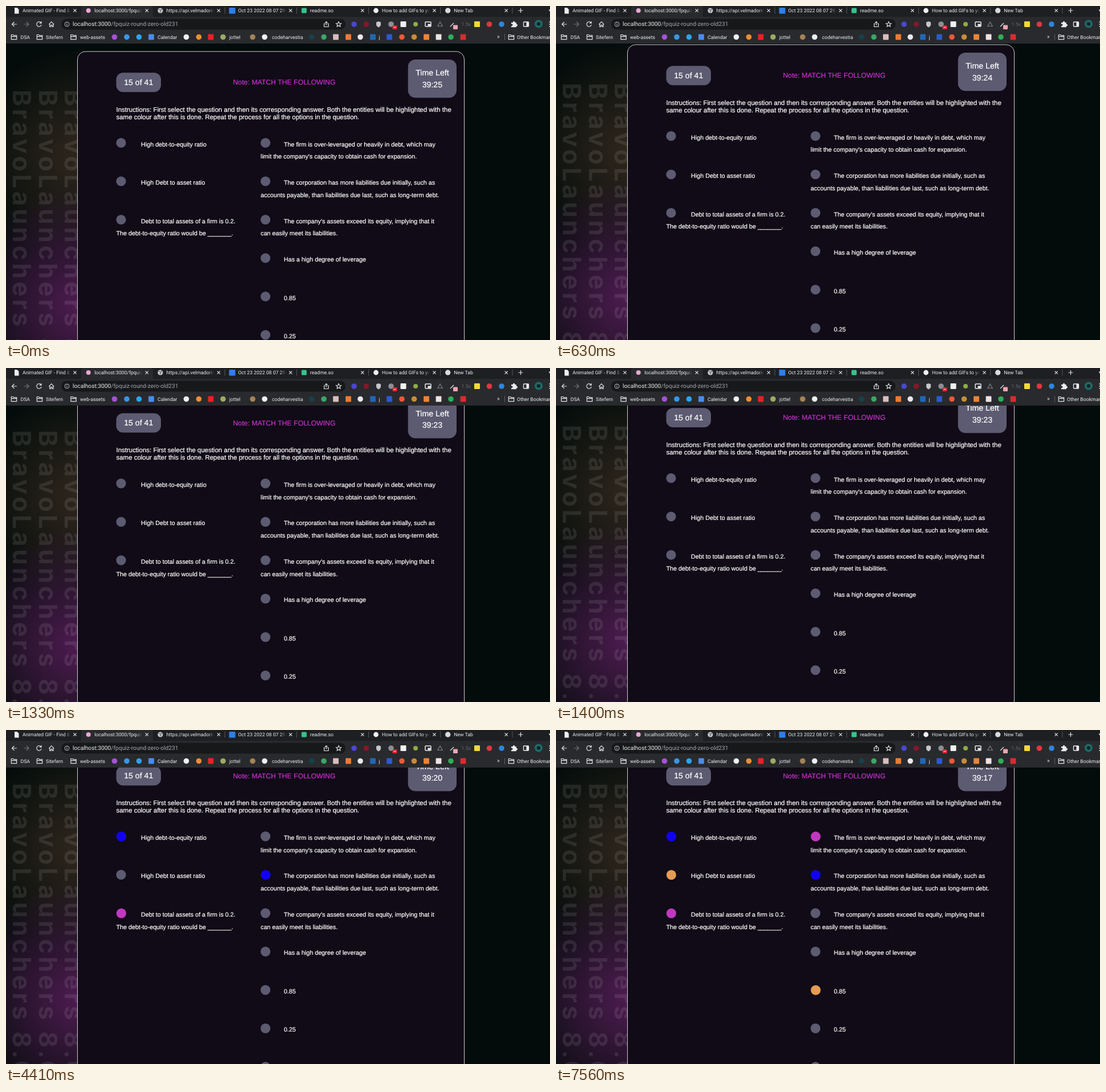
An HTML page for the animation above (8000 ms loop, 955 px wide and 587 px high).

```html
<!DOCTYPE html>
<html lang="en">
<head>
<meta charset="utf-8">
<title>Quiz</title>
<style>
html, body { margin: 0; width: 100%; height: 100%; overflow: hidden; background: #040c0b; }
svg { display: block; width: 100vw; height: 100vh; }
text { white-space: pre; text-rendering: geometricPrecision; }
.ui { font: 8.7px Roboto, sans-serif; fill: #eeeff1; }
.page { font: 10.78px "Liberation Sans", Arial, sans-serif; fill: #fff; }
.page text { stroke: #fff; stroke-width: .22; }
.page .note { font-size: 12.25px; fill: #c632cc; stroke: #c632cc; }
.page .intro { font-size: 11.46px; }
.page .big { font-size: 14.15px; text-anchor: middle; }
.page .deco { font: 700 44px Inter, sans-serif; letter-spacing: 5px; fill-opacity: .095; stroke: none; }
.line { fill: none; stroke: #e3e4e7; stroke-width: 1.2; }
</style>
</head>
<body>
<svg id="stage" viewBox="0 0 955 587" preserveAspectRatio="none"></svg>
<script>
const LOOP = 8000;
const STRIP = '#1e1f22', BAR = '#292a2d', PILL = '#17181a', GREY = '#5d5b71';
const BLUE = '#1200f4', PINK = '#c038c0', ORANGE = '#e69b52';

const TICKS = [210, 1260, 2310, 3360, 4410, 5390, 6440, 7490];
const SCROLL = [[560, -1.4], [630, -12], [700, -26.8], [1260, -30], [1330, -37.7], [1400, -47], [1470, -53.7]];
const PICKS = [[1960, 'q0', BLUE], [3010, 'a1', BLUE], [4060, 'q2', PINK],
  [5390, 'a0', PINK], [6440, 'q1', ORANGE], [7490, 'a4', ORANGE]];

const text = (x, y, s, attrs = '') => `<text x="${x}" y="${y}" ${attrs}>${s}</text>`;
const rect = (x, y, w, h, r, fill, attrs = '') =>
  `<rect x="${x}" y="${y}" width="${w}" height="${h}" rx="${r}" fill="${fill}" ${attrs}/>`;
const dot = (x, y, r, fill, attrs = '') => `<circle cx="${x}" cy="${y}" r="${r}" fill="${fill}" ${attrs}/>`;
const line = (d, attrs = '') => `<path class="line" d="${d}" ${attrs}/>`;
const fade = (id, color) => `<linearGradient id="${id}"><stop stop-color="${color}" stop-opacity="0"/>
  <stop offset=".42" stop-color="${color}"/></linearGradient>`;
const glow = (id, color, y, r) => `<radialGradient id="${id}" gradientUnits="userSpaceOnUse" cx="132" cy="${y}" r="${r}">
  <stop stop-color="${color}"/><stop offset=".5" stop-color="${color}" stop-opacity=".5"/>
  <stop offset="1" stop-color="${color}" stop-opacity="0"/></radialGradient>`;

// "x colour kind" entries: c = circle, s = square
const marks = (list, y, r) => list.split(', ').map(item => {
  const [x, color, kind] = item.split(' ');
  return kind === 'c' ? dot(x, y, r, color) : rect(x - r, y - r, 2 * r, 2 * r, 1, color);
}).join('');

const folder = x => line(`M${x - 4.7} 50.5h3.2l1.2 1.3h5v6.9h-9.4zM${x - 4.7} 53.6h9.4`);

const globe = (x, y) => dot(x, y, 4.6, '#c9cbd0')
  + line(`M${x - 3} ${y - 2}l3 1l1 2l-2 2M${x + 1} ${y - 3}l2 2`, 'style="stroke:#55585e"');

function tabs() {
  const titles = ['Animated GIF - Find &amp; Ma', 'localhost:3000/fpquiz-ro', 'https://api.velmadorin',
    'Oct 23 2022 08 07 29', 'readme.so', 'How to add GIFs to your', 'New Tab'];
  const icons = [
    x => `<path d="M${x - 3.5} 3h4.5l3 3v7.5h-7.5z" fill="#eceded"/>`,
    x => dot(x, 8, 4, '#e9a6d6'),
    x => globe(x, 8),
    x => rect(x - 5.5, 3, 11, 10.5, 1, '#2f7fe8'),
    x => rect(x - 4.5, 3.5, 9, 9, 1.5, '#35c48b'),
    x => dot(x, 8, 4.4, '#f1f1f1'),
    x => dot(x, 8, 4.7, '#d9dadd')
  ];
  let out = rect(0, 0, 955, 20, 0, STRIP) + `<path d="M128 20q4 0 4-4V4q0-4 4-4H254q4 0 4 4v12q0 4 4 4z" fill="${BAR}"/>`;
  titles.forEach((title, i) => {
    const left = 5.5 + 126.2 * i, x = left + 115.5;
    out += icons[i](left + 13) + text(left + 23.5, 11, title)
      + rect(left + 97, 1, 25, 15, 0, `url(#${i === 1 ? 'fadeBar' : 'fadeStrip'})`)
      + line(`M${x - 2.6} 5.4l5.2 5.2m0 -5.2l-5.2 5.2`);
    if (i > 1) out += rect(left + 125.7, 2.5, 1, 11, 0, '#56585d');
  });
  return out + line('M899.5 8h8M903.5 4v8') + '<path d="M952.5 6.5h5l-2.5 3.5z" fill="#e3e4e7"/>';
}

function toolbar() {
  return rect(0, 19, 955, 47, 0, BAR) + rect(97, 22.5, 499, 19, 9.5, PILL)
    + line('M19 32h-8.5m4 -4l-4 4l4 4')
    + line('M31.5 32h8.5m-4 -4l4 4l-4 4', 'opacity=".4"')
    + line('M61.3 29.3a4.2 4.2 0 1 0 .8 3.6M62 27v3.2h-3.2')
    + line('M75.3 32.3l4.5 -4.5l4.5 4.5M76.7 31.5v5h2v-3h2.3v3h2v-5')
    + dot(107, 32, 4, 'none', 'stroke="#b4b7bc"') + line('M107 31.5v2.7M107 29.3v1.1', 'opacity=".8"')
    + text(117, 35.2, 'localhost:3000<tspan fill="#a5a8ae">/fpquiz-round-zero-old231</tspan>', 'style="font-size:10.24px"')
    + line('M560.5 31h-2v5.5h7.5v-5.5h-2M562.250 34v-6.5m-2.2 2.2l2.2 -2.2l2.2 2.2')
    + line('M584 27.6l1.3 2.9l3.2 .3l-2.4 2.1l.7 3.1l-2.8 -1.6l-2.8 1.6l.7 -3.1l-2.4 -2.1l3.2 -.3z')
    + marks('611 #4b46cf c, 632.5 #84172a c, 676 #8d8f94 c, 848.5 #dd3840 c, 870 #2c86dd c', 32, 4.8)
    + marks('697.5 #f1f1f1 s, 827 #f4d83a s', 32, 5)
    + '<path d="M654 27l4 1.5v4q0 3 -4 5q-4 -2 -4 -5v-4z" fill="#c4c6ca"/>'
    + rect(678.5, 34, 8, 7, 1.5, '#e12a35') + rect(680.5, 37, 4, 1, 0, '#fff')
    + dot(719, 32, 4, '#8dae45')
    + rect(736, 28, 10, 8, 1, 'none', 'stroke="#f0f0f0" stroke-width="1.5"') + rect(740.5, 31.5, 4.5, 3.5, 0, '#f0f0f0')
    + line('M762 28l4.2 7.5h-8.4z', 'opacity=".45"')
    + line('M780 36l6 -6') + rect(785, 33.5, 8, 7.5, 1, '#f0a5b0')
    + text(799.5, 35, '1.5x', 'opacity=".3"')
    + '<path d="M887 29h3a1.7 1.7 0 1 1 3.2 0h2.6v3a1.7 1.7 0 1 1 0 3.2v2h-8.8v-2.5a1.7 1.7 0 1 0 0 -3z" fill="#eceded"/>'
    + rect(908.5, 28, 9, 8, 1, 'none', 'stroke="#eceded" stroke-width="1.3"') + rect(913.5, 28, 4, 8, 0, '#eceded')
    + dot(935, 31.5, 7, '#1d6b68') + dot(935, 31.5, 3.2, '#10262a')
    + [28, 32, 36].map(y => dot(954.5, y, 1, '#e3e4e7')).join('');
}

function bookmarks() {
  const labels = [[25.5, 'DSA'], [70, 'Sitefern'], [130, 'web-assets'], [266, 'Calendar'],
    [392, 'jottel'], [467, 'codeharvestia'], [654.5, 'j'], [897, 'Other Bookmarks']];
  return [14, 59, 118.5, 887].map(folder).join('')
    + labels.map(([x, s]) => text(x, 57.6, s)).join('')
    + marks('190.5 #a552d6 c, 212 #3996e6 c, 233.5 #2ba3ee c, 316.5 #f2f2f2 c, 338.5 #ee8d35 c, 381 #9aab62 c, '
      + '433 #a58356 c, 454 #f2f2f2 c, 536.5 #17414a c, 558 #3aa667 c, 622 #ece6ee c, 695 #ee5838 c, 716.5 #c78b3b c, 781 #2fae58 c', 54.5, 4.8)
    + marks('255 #4a8bee s, 359.5 #ee1f27 s, 579 #d8bcbc s, 601 #ee7b32 s, 644 #2067b6 s, 673 #2c58d4 s, '
      + '738 #ee8337 s, 759.5 #f0e3e3 s, 802.5 #d92b30 s', 54.5, 4.9)
    + text(862, 57.4, '»', 'style="font-size:10px"') + rect(875, 49, 1, 11, 0, '#5b5d62');
}

function page() {
  const left = [['High debt-to-equity ratio'], ['High Debt to asset ratio'],
    ['Debt to total assets of a firm is 0.2.', 'The debt-to-equity ratio would be _______.']];
  const right = [
    ['The firm is over-leveraged or heavily in debt, which may', "limit the company's capacity to obtain cash for expansion."],
    ['The corporation has more liabilities due initially, such as', 'accounts payable, than liabilities due last, such as long-term debt.'],
    ["The company's assets exceed its equity, implying that it", 'can easily meet its liabilities.'],
    ['Has a high degree of leverage'], ['0.85'], ['0.25'], ['']];
  const column = (rows, key, x, indent) => rows.map(([first, second = ''], i) => {
    const y = 240.5 + 67.5 * i;
    return dot(x + 8.5, y, 8.6, GREY, `id="${key}${i}"`)
      + text(x + indent, y + 6.2, first) + text(x, y + 27.8, second);
  }).join('');

  return rect(0, 0, 126, 800, 0, 'url(#brown)') + rect(0, 0, 126, 800, 0, 'url(#purple)')
    + [12, 57.5, 103].map(x => `<text class="deco" transform="translate(${x} 147) rotate(90)">BravoLaunchers 8.0</text>`).join('')
    + rect(125.5, 80, 679, 900, 14, '#100b16', 'stroke="#cfcdd2"')
    + rect(193.5, 117.3, 78.5, 34, 12, GREY) + text(232.7, 139, '15 of 41', 'class="big"')
    + text(398.5, 138.3, 'Note: MATCH THE FOLLOWING', 'class="note"')
    + rect(705.7, 94, 85.3, 67.3, 13, GREY) + text(748.4, 122.3, 'Time Left', 'class="big"')
    + text(748.4, 142.7, '', 'class="big" id="clock"')
    + text(193.5, 185.6, 'Instructions: First select the question and then its corresponding answer. Both the entities will be highlighted with the', 'class="intro"')
    + text(193.5, 199.1, 'same colour after this is done. Repeat the process for all the options in the question.', 'class="intro"')
    + column(left, 'q', 193.5, 43.5) + column(right, 'a', 447, 40.7);
}

const stage = document.getElementById('stage');
stage.innerHTML = `<defs>${fade('fadeStrip', STRIP)}${fade('fadeBar', BAR)}
  ${glow('brown', '#30271d', 265, 190)}${glow('purple', '#4f1c52', 525, 210)}</defs>
  ${rect(0, 0, 955, 587, 0, '#040c0b')}
  <g id="page" class="page">${page()}</g>
  <g class="ui">${tabs()}${toolbar()}${bookmarks()}</g>`;

const $ = id => document.getElementById(id);

function draw(t) {
  const step = SCROLL.filter(([at]) => at <= t).pop();
  $('page').setAttribute('transform', `translate(0 ${step ? step[1] : 0})`);
  $('clock').textContent = '39:' + (25 - TICKS.filter(at => at <= t).length);
  for (const [at, id, color] of PICKS) {
    const picked = t >= at;
    $(id).setAttribute('fill', picked ? color : GREY);
    $(id).setAttribute('transform', picked ? 'translate(.4 .4)' : '');
  }
}

const start = performance.now();
function frame() {
  draw((performance.now() - start) % LOOP);
  requestAnimationFrame(frame);
}
frame();
</script>
</body>
</html>
```
